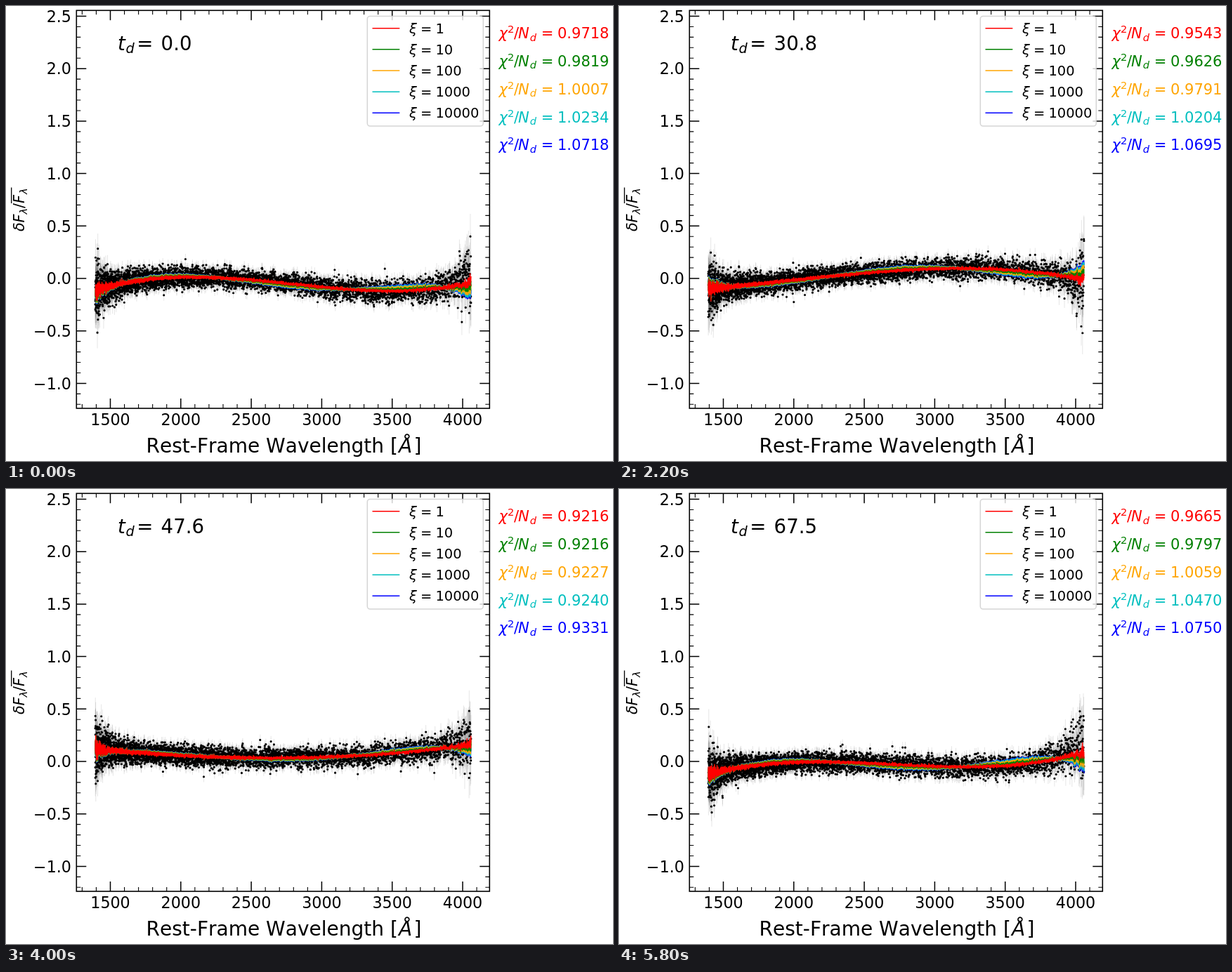
An HTML page with a canvas that plays this animation: 864x648 px, repeating every 6 s.

```html
<!DOCTYPE html>
<html lang="en">
<head>
<meta charset="utf-8">
<title>Residual spectrum over time</title>
<style>
  html, body { margin: 0; width: 864px; height: 648px; overflow: hidden; background: #fff; }
  canvas, svg { position: absolute; left: 0; top: 0; display: block; }
  text { font-family: "DejaVu Sans", sans-serif; font-kerning: none; white-space: pre; }
  .it { font-style: oblique; }
</style>
</head>
<body>
<canvas id="plot" width="864" height="648"></canvas>
<svg id="chart" width="864" height="648" viewBox="0 0 864 648"></svg>
<script>
const STEP = 200, COUNT = 30, PIXELS = 4646;
const LEFT = 127, RIGHT = 662;
const COLORS = ['#ff0000', '#008000', '#ffa500', '#00bfbf', '#0000ff'];

// Key epochs; steps in between are blended.
// cubic: trend in px over -1..1, stray: departure of the stiffest model.
const epochs = [
  { step: 0, delay: 0, stray: 12, cubic: [394.6, 27.8, 4.7, -33.3], chi: [0.9718, 0.9819, 1.0007, 1.0234, 1.0718] },
  { step: 5, delay: 14.4, stray: 5, cubic: [373.6, -14.2, -2, -3.3], chi: [0.9760, 0.9769, 0.9780, 0.9797, 0.9819] },
  { step: 11, delay: 30.8, stray: -12, cubic: [377, -17.2, 19.5, 10.7], chi: [0.9543, 0.9626, 0.9791, 1.0204, 1.0695] },
  { step: 16, delay: 37.1, stray: -6, cubic: [378, -31.3, 7.5, 5.3], chi: [0.9357, 0.9372, 0.9418, 0.9465, 0.9567] },
  { step: 20, delay: 47.6, stray: 8, cubic: [383, -1.7, -16, -1.3], chi: [0.9216, 0.9216, 0.9227, 0.9240, 0.9331] },
  { step: 25, delay: 57.8, stray: 0, cubic: [392, 9.8, 7.7, -6.3], chi: [0.9440, 0.9440, 0.9438, 0.9446, 0.9450] },
  { step: 29, delay: 67.5, stray: 13, cubic: [392.5, 13.6, -2, -29.6], chi: [0.9665, 0.9797, 1.0059, 1.0470, 1.0750] }
];

const mix = (a, b, k) => Array.isArray(a) ? a.map((v, i) => mix(v, b[i], k)) : a + (b - a) * k;
const fall = (d, reach) => Math.exp(-d / reach);

function stateAt(n) {
  const next = Math.max(1, epochs.findIndex(e => e.step >= n));
  const a = epochs[next - 1], b = epochs[next];
  const k = (n - a.step) / (b.step - a.step);
  const state = {};
  for (const key in a) state[key] = mix(a[key], b[key], k);
  return state;
}

function gaussian(seed) {
  const rand = () => {
    seed = (seed + 0x6D2B79F5) | 0;
    let t = Math.imul(seed ^ (seed >>> 15), 1 | seed);
    t = (t + Math.imul(t ^ (t >>> 7), 61 | t)) ^ t;
    return ((t ^ (t >>> 14)) >>> 0) / 4294967296;
  };
  return () => Math.sqrt(-2 * Math.log(1 - rand())) * Math.cos(2 * Math.PI * rand());
}

// Logarithmic wavelength grid with the scatter of data and models in px.
const grid = Array.from({ length: PIXELS }, (_, i) => {
  const x = 148.5 + (1393 * 10 ** (i * 1e-4) - 1500) * 0.2006;
  const l = x - LEFT, r = Math.max(RIGHT - x, 0);
  const u = 2 * l / (RIGHT - LEFT) - 1;
  return {
    x, r, u,
    data: 6.2 + 1 + u + 6 * fall(l, 40) + 12 * fall(l, 9) + 8 * fall(r, 32) + 15 * fall(r, 9),
    model: 1.1 + 4.5 * fall(l, 10) + 1.6 * fall(l, 40) + 3.2 * fall(r, 10) + 0.8 * fall(r, 40),
    wave: 3 * Math.sin(x * 0.75) * fall(r, 12),
    // Quartic Legendre shape, stronger towards the red end.
    bend: (35 * u ** 4 - 30 * u * u + 3) / 8 * (1 + 0.6 * u)
  };
});

const ctx = document.getElementById('plot').getContext('2d');

function drawData(n, { cubic, stray }) {
  const noise = gaussian(1000 + n * 77), ripple = gaussian(5000 + n * 31);
  const trend = grid.map(({ u }) => cubic.reduceRight((sum, c) => sum * u + c, 0));
  const dots = grid.map((g, i) => trend[i] - 0.8 * stray * fall(g.r, 20) + noise() * g.data);

  ctx.clearRect(0, 0, 864, 648);
  ctx.fillStyle = 'rgba(0,0,0,0.1)';
  grid.forEach((g, i) => ctx.fillRect(g.x - 0.5, dots[i] - 1.1 * g.data, 1, 2.2 * g.data));

  ctx.fillStyle = '#000';
  ctx.beginPath();
  grid.forEach((g, i) => {
    ctx.moveTo(g.x + 1.6, dots[i]);
    ctx.arc(g.x, dots[i], 1.6, 0, 2 * Math.PI);
  });
  ctx.fill();

  const jitter = grid.map(g => ripple() * g.model + g.wave);
  ctx.lineWidth = 1.4;
  ctx.lineJoin = 'round';
  for (let c = COLORS.length - 1; c >= 0; c--) {
    const share = 1 - (1 - c / 4) ** 1.5;
    ctx.strokeStyle = COLORS[c];
    ctx.beginPath();
    grid.forEach((g, i) => ctx.lineTo(g.x, trend[i] + stray * share * g.bend + jitter[i]));
    ctx.stroke();
  }
}

const chart = document.getElementById('chart');

function add(tag, attrs, parent = chart) {
  const el = document.createElementNS('http://www.w3.org/2000/svg', tag);
  for (const key in attrs) el.setAttribute(key, attrs[key]);
  return parent.appendChild(el);
}
function label(str, x, y, size, attrs = {}, parent = chart) {
  const el = add('text', { x, y, 'font-size': size, ...attrs }, parent);
  el.textContent = str;
  return el;
}
const italic = { class: 'it' };

function drawAxes() {
  const box = { l: 100.3, r: 688.3, t: 6.3, b: 573 };
  let major = '', minor = '';
  for (let i = 13; i <= 41; i++) {
    const x = 148.5 + (i - 15) * 20.06, len = i % 5 ? 6 : 14;
    const d = `M${x} ${box.b}v${-len}M${x} ${box.t}v${len}`;
    if (i % 5) minor += d;
    else {
      major += d;
      label(i * 100, x, 596.5, 22.2, { 'text-anchor': 'middle' });
    }
  }
  for (let i = -12; i <= 25; i++) {
    const y = 388 - i * 14.94, len = i % 5 ? 6 : 14;
    const d = `M${box.l} ${y}h${len}M${box.r} ${y}h${-len}`;
    if (i % 5) minor += d;
    else {
      major += d;
      const str = (i < 0 ? '\u2212' : '') + Math.abs(i / 10).toFixed(1);
      label(str, 93, y + 8.2, 22.2, { 'text-anchor': 'end' });
    }
  }
  add('path', { d: minor, stroke: '#000', 'stroke-width': 1.1 });
  add('path', { d: major, stroke: '#000', 'stroke-width': 1.5 });
  add('rect', {
    x: box.l, y: box.t, width: box.r - box.l, height: box.b - box.t,
    fill: 'none', stroke: '#000', 'stroke-width': 1.6
  });

  label('Rest-Frame Wavelength [', 199.6, 635.5, 28);
  label('Å', 559, 635.5, 28, italic);
  label(']', 580.6, 635.5, 28);

  const side = add('g', { transform: 'translate(26 321) rotate(-90)' });
  label('δ', 0, 0, 20.8, italic, side);
  label('F', 12.5, 0, 20.8, italic, side);
  label('λ', 24.5, 4, 14.6, italic, side);
  label('/', 33, 0, 20.8, {}, side);
  label('F', 40, 0, 20.8, italic, side);
  label('λ', 53, 4, 14.6, italic, side);
  add('path', { d: 'M40 -18.3H62.5', stroke: '#000', 'stroke-width': 1.3 }, side);
}

function drawLegend() {
  add('rect', {
    x: 514.3, y: 14.5, width: 165, height: 156.5, rx: 4,
    fill: '#fff', 'fill-opacity': 0.8, stroke: '#ccc', 'stroke-opacity': 0.8, 'stroke-width': 1.6
  });
  COLORS.forEach((color, i) => {
    const y = 38.7 + i * 30.15;
    add('path', { d: `M521.5 ${y - 7}H560.3`, stroke: color, 'stroke-width': 1.5 });
    label('ξ', 574, y, 19.44, italic);
    label('=', 590, y, 19.44);
    label(10 ** i, 611.5, y, 19.44);
  });
}

function drawReadouts() {
  label('t', 159, 63, 27.6, italic);
  label('d', 170.5, 67, 19.3, italic);
  label('=', 186.3, 63, 27.6);
  const time = label('', 220.6, 63, 27.6);
  const fits = COLORS.map((fill, i) => {
    const row = add('g', { fill }), y = 46 + i * 39.85;
    label('χ', 701.5, y, 21, italic, row);
    label('2', 714, y - 8, 14.6, {}, row);
    label('/', 723, y, 21, {}, row);
    label('N', 729, y, 21, italic, row);
    label('d', 745.8, y + 3.5, 14.6, italic, row);
    label('=', 761.8, y, 21, {}, row);
    return label('', 785, y, 21, {}, row);
  });
  return { time, fits };
}

drawAxes();
drawLegend();
const readouts = drawReadouts();
let shown = -1;

function tick() {
  const n = Math.floor(performance.now() / STEP) % COUNT;
  if (n !== shown) {
    shown = n;
    const state = stateAt(n);
    drawData(n, state);
    readouts.time.textContent = state.delay.toFixed(1);
    readouts.fits.forEach((el, i) => { el.textContent = state.chi[i].toFixed(4); });
  }
  requestAnimationFrame(tick);
}
tick();
</script>
</body>
</html>
```
